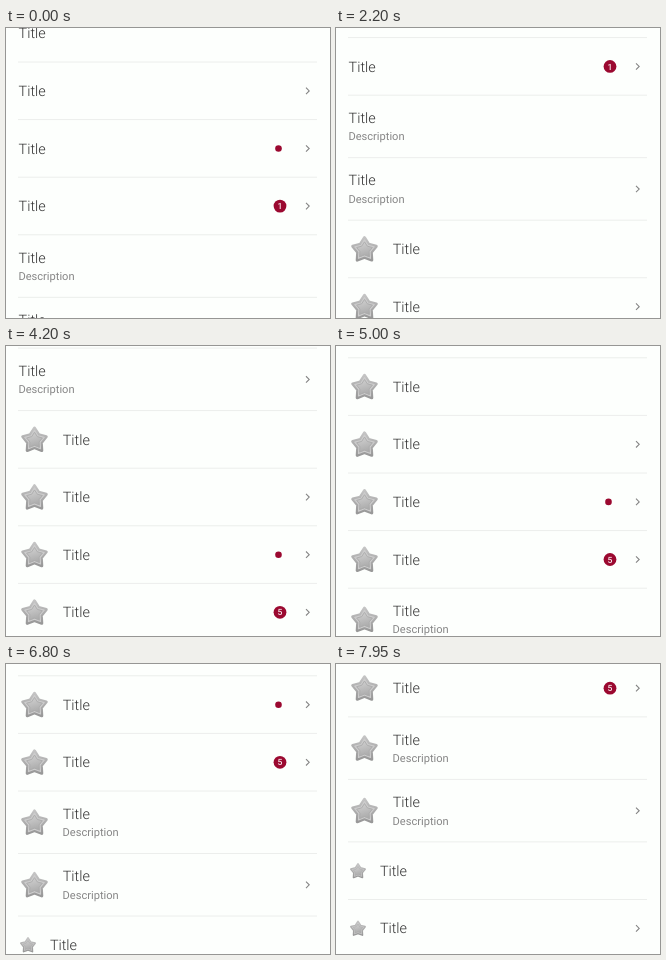
An HTML page that plays this animation: 324x290 px, repeating every 8 s.

```html
<!DOCTYPE html>
<html lang="en">
<head>
<meta charset="utf-8">
<title>Scrolling list</title>
<style>
  html, body { margin: 0; width: 100%; height: 100%; overflow: hidden; background: #fdfffd; }
  svg { display: block; }
  text { font-family: Roboto, sans-serif; text-rendering: geometricPrecision; }
  .title { font-size: 14.4px; font-weight: 300; fill: #303030; }
  .description { font-size: 11.1px; fill: #868686; }
  .count { font-size: 8.6px; font-weight: 500; fill: #f6e4e8; text-anchor: middle; }
  .line { stroke: #eceeec; }
  .chevron { fill: none; stroke: #858585; stroke-width: 1.1; }
  .red { fill: #9b0930; }
</style>
</head>
<body>
<svg width="324" height="290" viewBox="0 0 324 290">
  <defs>
    <linearGradient id="rim" x2="0" y2="1">
      <stop offset="0" stop-color="#c4c4c4"/><stop offset="1" stop-color="#989898"/>
    </linearGradient>
    <linearGradient id="face" x2="0.3" y2="1">
      <stop offset="0" stop-color="#d8d8d8"/><stop offset="1" stop-color="#aaaaaa"/>
    </linearGradient>
    <g id="star" stroke-linejoin="round"></g>
  </defs>
  <g id="list"></g>
</svg>
<script>
const LOOP = 8000, STEP = 50;
const PLAIN_HEIGHT = 57.6, DETAIL_HEIGHT = 62.5, FIRST_TOP = -23.6;

// Scroll offset over time: [ms, px]
const SCROLL = [[0, 0], [1200, 76.3], [3150, 199.8], [4200, 267.2],
                [5800, 372.8], [6800, 435.2], [7950, 509.3], [8000, 512.5]];

const ROWS = [
  {}, { chevron: true }, { chevron: true, dot: true }, { chevron: true, count: 1 },
  { detail: true }, { detail: true, chevron: true },
  { star: 1 }, { star: 1, chevron: true },
  { star: 1, chevron: true, dot: true }, { star: 1, chevron: true, count: 5 },
  { star: 1, detail: true }, { star: 1, detail: true, chevron: true },
  { star: 0.6 }, { star: 0.6, chevron: true },
];

const rowHeight = row => row.detail ? DETAIL_HEIGHT : PLAIN_HEIGHT;

function starPoints(outer, inner) {
  return Array.from({ length: 10 }, (_, i) => {
    const radius = i % 2 ? inner : outer, angle = i * Math.PI / 5;
    return `${(radius * Math.sin(angle)).toFixed(2)},${(-radius * Math.cos(angle)).toFixed(2)}`;
  }).join(" ");
}

function rowMarkup(row, top) {
  const height = rowHeight(row);
  const middle = top + height / 2 + 0.1;
  const textX = !row.star ? 12.6 : row.star === 1 ? 56.7 : 43.9;
  const parts = [
    `<path class="line" d="M12 ${top + height}H311"/>`,
    `<text class="title" x="${textX}" y="${top + (row.detail ? 27.8 : 34)}">Title</text>`,
  ];
  if (row.detail)
    parts.push(`<text class="description" x="${textX - 0.2}" y="${top + 45.2}">Description</text>`);
  if (row.star)
    parts.push(`<use href="#star" transform="translate(${row.star === 1 ? 28.5 : 22} ${middle + row.star}) scale(${row.star})"/>`);
  if (row.chevron)
    parts.push(`<path class="chevron" d="M300 ${middle - 3.2}l3.2 3.2l-3.2 3.2"/>`);
  if (row.dot)
    parts.push(`<circle class="red" cx="272.5" cy="${middle}" r="3.3"/>`);
  if (row.count)
    parts.push(`<circle class="red" cx="274" cy="${middle}" r="6.4"/>`,
               `<text class="count" x="274" y="${middle + 3.1}">${row.count}</text>`);
  return parts.join("");
}

function scrollAt(time) {
  const next = SCROLL.findIndex(([ms]) => ms > time);
  const [t0, y0] = SCROLL[next - 1], [t1, y1] = SCROLL[next];
  return y0 + (y1 - y0) * (time - t0) / (t1 - t0);
}

document.getElementById("star").innerHTML =
  `<polygon points="${starPoints(12.4, 7.2)}" fill="url(#rim)" stroke="url(#rim)" stroke-width="3"/>
   <polygon points="${starPoints(10.2, 5.8)}" fill="url(#face)" stroke="#cccccc" stroke-width="1.2"/>
   <polygon points="${starPoints(8.2, 4.8)}" fill="none" stroke="#acacac" stroke-width="0.9"/>`;

const list = document.getElementById("list");
let rowTop = FIRST_TOP;
list.innerHTML = ROWS.map(row => {
  const markup = rowMarkup(row, rowTop);
  rowTop += rowHeight(row);
  return markup;
}).join("");

function draw() {
  const time = Math.floor((performance.now() + 0.01) / STEP) * STEP % LOOP;
  list.setAttribute("transform", `translate(0 ${-scrollAt(time)})`);
  requestAnimationFrame(draw);
}
draw();
</script>
</body>
</html>
```
